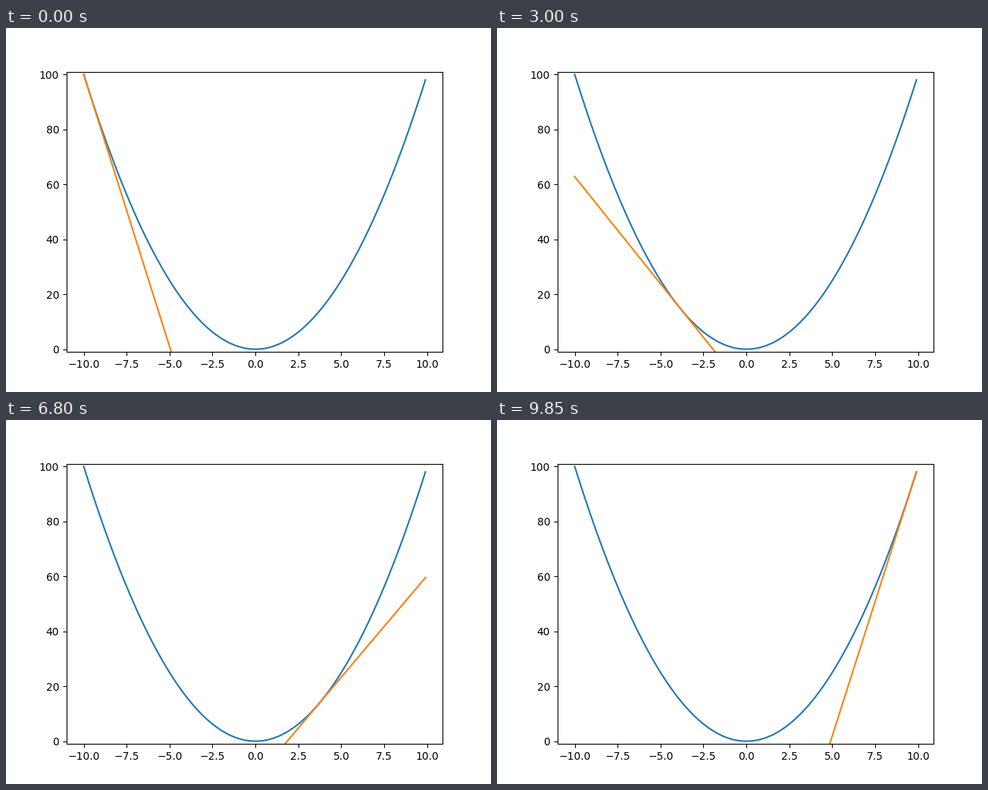
Recreate the animation shown at these times as a matplotlib script. Size 640 by 480 pixels, loop 9900 ms.

```python
import numpy as np
import matplotlib.pyplot as plt
from matplotlib.animation import FuncAnimation

STEP = 0.1
x = np.arange(-10, 10, STEP)
y = x ** 2

fig, ax = plt.subplots(figsize=(6.4, 4.8), dpi=100)
ax.plot(x, y)
tangent, = ax.plot(x, y)
ax.set_ylim(-1, 101)


def update(i):
    """Tangent at interior point i + 1, with a central-difference slope."""
    k = i + 1
    slope = (y[k + 1] - y[k - 1]) / (2 * STEP)
    tangent.set_ydata(y[k] + slope * (x - x[k]))
    return tangent,


anim = FuncAnimation(fig, update, frames=len(x) - 2, interval=50, repeat=True)
plt.show()
```
